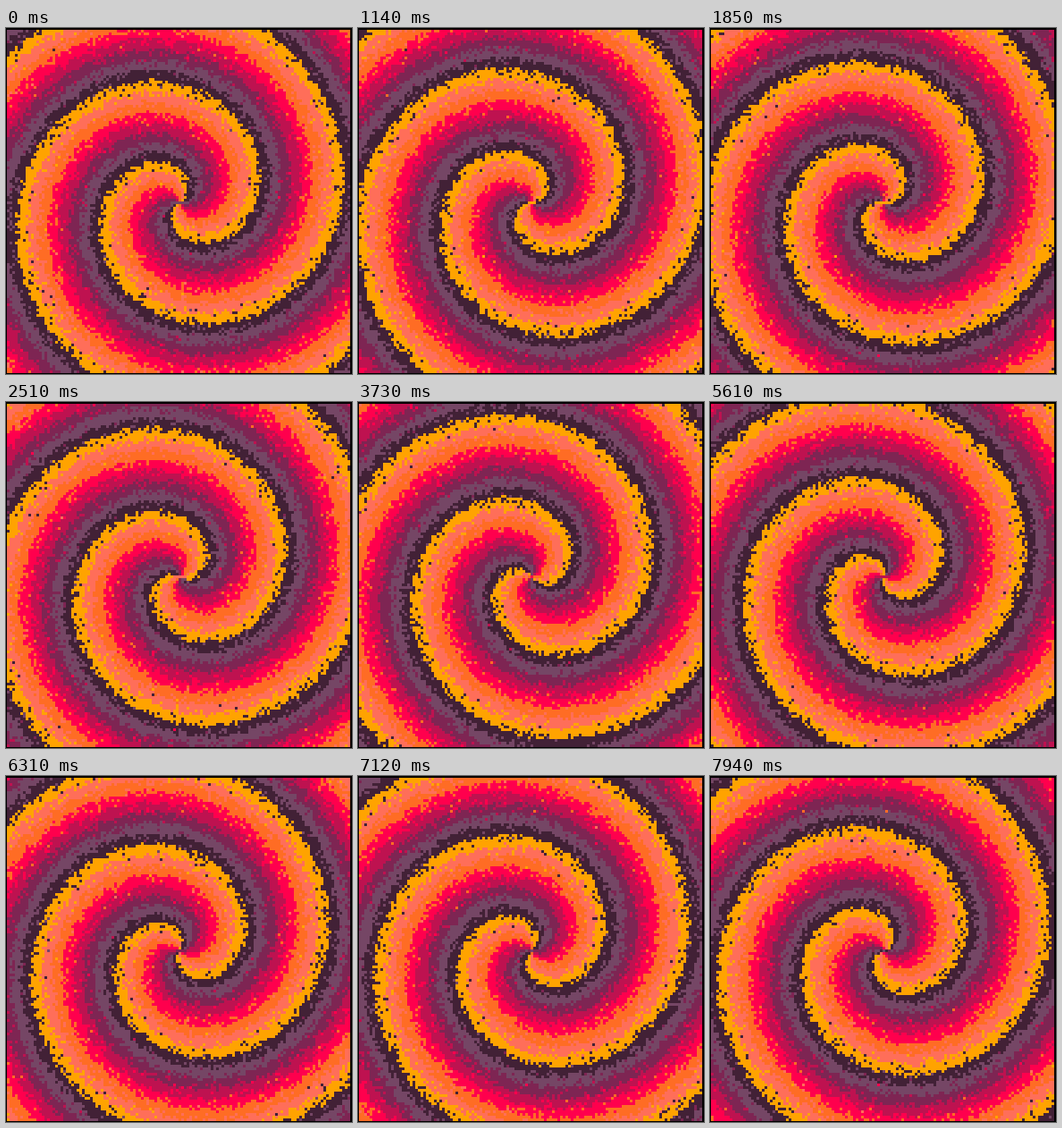
Write an HTML page with a canvas that moves like this. It is 387x387 px and loops after 8000 ms.

```html
<!DOCTYPE html>
<html lang="en">
<head>
<meta charset="utf-8">
<title>Spiral</title>
<style>
  html, body { margin: 0; height: 100%; overflow: hidden; background: #000; }
  canvas { display: block; width: 100vw; height: 100vh; image-rendering: pixelated; }
</style>
</head>
<body>
<canvas id="stage" width="387" height="387"></canvas>
<script>
const LOOP = 8000, STEPS = 136;
const SIZE = 128, CELL = 3, LEFT = 1, TOP = 2;
const ARM_GAP = 32;             // cells between neighbouring arms
const TURN = 0.131 * LOOP / 1000 / STEPS;
const START = -0.096;
const REFRESH = 0.17;           // chance that a cell is repainted in a step

// Listed from the leading edge of an arm inwards, packed as ABGR.
const palette = ['ffa300', 'ff6e59', 'ff6c24', 'ff004d', 'be1250', '7e2553', '754665', '422136']
  .map(hex => {
    const rgb = parseInt(hex, 16);
    return (0xff000000 | (rgb & 255) << 16 | (rgb & 0xff00) | rgb >> 16) >>> 0;
  });

const stage = document.getElementById('stage').getContext('2d');
stage.imageSmoothingEnabled = false;
const grid = document.createElement('canvas');
grid.width = grid.height = SIZE;
const gridContext = grid.getContext('2d');
const image = gridContext.createImageData(SIZE, SIZE);
const pixels = new Uint32Array(image.data.buffer);

const spiral = Float64Array.from({ length: SIZE * SIZE }, (_, i) => {
  const x = i % SIZE - SIZE / 2, y = Math.floor(i / SIZE) - SIZE / 2;
  return Math.hypot(x, y) / ARM_GAP + Math.atan2(y, x) / Math.PI;
});

function random(cell, step) {
  let h = Math.imul(cell + 1, 0x9e3779b1) ^ Math.imul(step + 1000, 0x85ebca6b);
  h = Math.imul(h ^ h >>> 16, 0x7feb352d);
  h = Math.imul(h ^ h >>> 15, 0x846ca68b);
  return ((h ^ h >>> 16) >>> 0) / 2 ** 32;
}

// Each cell keeps the colour of the last step in which it was repainted.
function lastPainted(cell, step) {
  while (random(cell, step) > REFRESH) step--;
  return step;
}

function draw(step) {
  for (let i = 0; i < pixels.length; i++) {
    const phase = START + lastPainted(i, step) * TURN - spiral[i];
    pixels[i] = palette[Math.floor((phase - Math.floor(phase)) * palette.length)];
  }
  gridContext.putImageData(image, 0, 0);
  stage.fillStyle = '#000';
  stage.fillRect(0, 0, 387, 387);
  stage.drawImage(grid, LEFT, TOP, SIZE * CELL, SIZE * CELL);
}

const began = performance.now();
let shown = -1;
function tick() {
  const step = Math.floor((performance.now() - began) % LOOP / LOOP * STEPS);
  if (step !== shown) draw(shown = step);
  requestAnimationFrame(tick);
}
tick();
</script>
</body>
</html>
```
